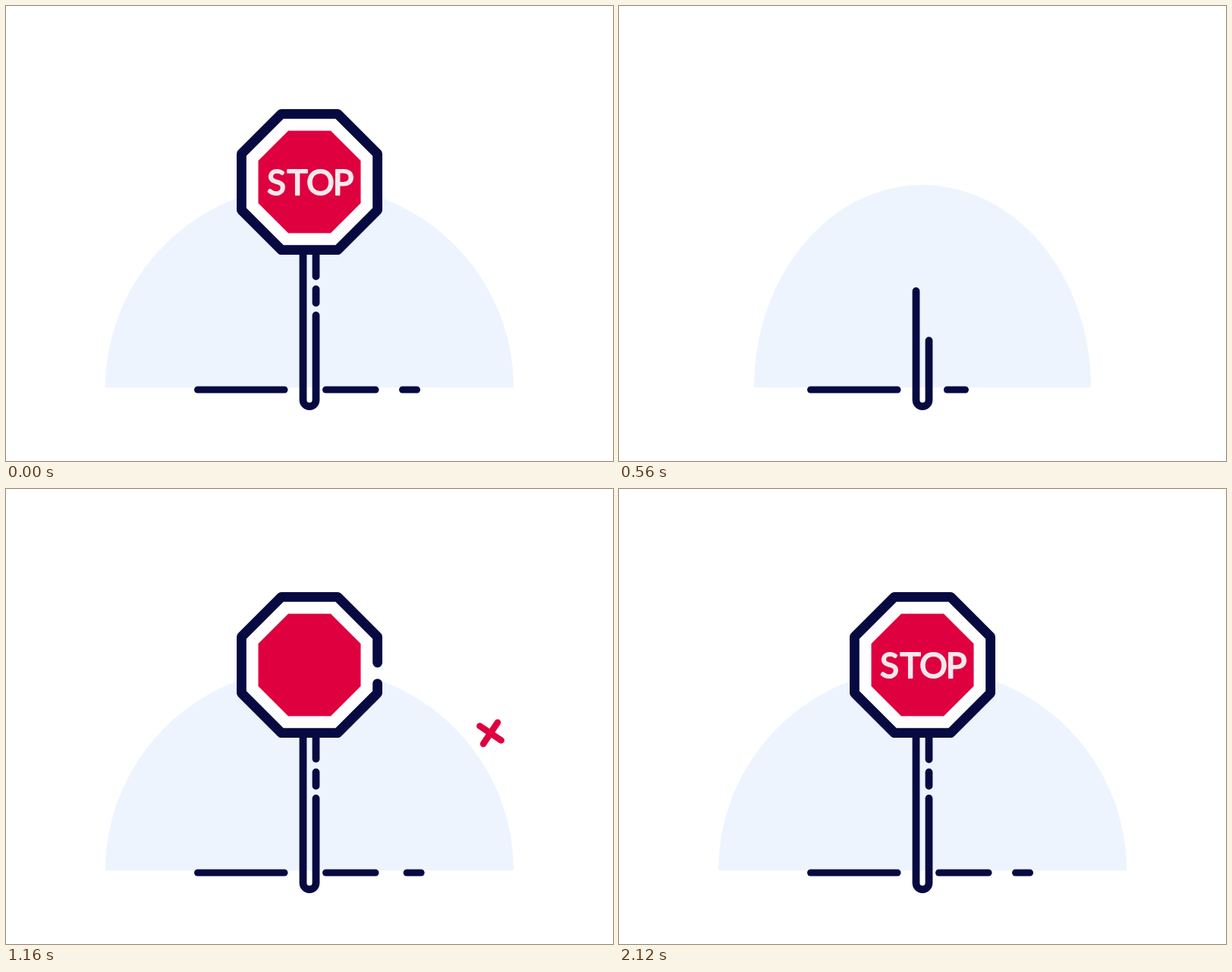
These frames come from a looping animation (800 by 600 pixels, 2320 ms). An HTML page with a canvas:

```html
<!DOCTYPE html>
<html lang="en">
<head>
<meta charset="utf-8">
<title>Stop sign</title>
<style>
html, body { margin: 0; width: 100%; height: 100%; overflow: hidden; background: #fff; }
canvas { display: block; }
</style>
</head>
<body>
<canvas id="stage" width="800" height="600"></canvas>
<script>
const ctx = document.getElementById('stage').getContext('2d');
const NAVY = '#070a41', RED = '#df003f', PALE = '#edf4fe', TEXT = '#f2e9ec';
const LOOP = 2320, STEP = 40, REST = 2120, MARK_LIFE = 380;

const linear = p => p;
const quadOut = p => 1 - (1 - p) ** 2;
const cubicOut = p => 1 - (1 - p) ** 3;
const inOut = p => p < .5 ? 2 * p * p : 1 - 2 * (1 - p) ** 2;
const progress = (t, from, to) => Math.min(1, Math.max(0, (t - from) / (to - from)));
const tween = (t, from, to, a, b, ease = quadOut) => a + (b - a) * ease(progress(t, from, to));

function line(x1, y1, x2, y2, width, color = NAVY) {
  ctx.beginPath();
  ctx.moveTo(x1, y1);
  ctx.lineTo(x2, y2);
  ctx.lineWidth = width;
  ctx.strokeStyle = color;
  ctx.stroke();
}

function dome(t) {
  const rx = tween(t, 419, 800, 0, 296, cubicOut) - tween(t, 800, 1000, 0, 27, inOut);
  const ry = tween(t, 419, 560, 0, 267, cubicOut);
  ctx.fillStyle = PALE;
  ctx.beginPath();
  ctx.ellipse(400, 503, rx, ry, 0, Math.PI, 2 * Math.PI);
  ctx.fill();
}

function ground(t) {
  const dash = (a, b) => line(a, 506, b, 506, 9);
  if (t > 80) dash(252.5, tween(t, 80, 280, 252.5, 377) - tween(t, 280, 520, 0, 10));
  if (t > 440) dash(tween(t, 430, 990, 440, 421.5),
    tween(t, 410, 800, 440, 495.5, inOut) - tween(t, 800, 1000, 0, 8.5));
  if (t > 840) {
    const x = tween(t, 840, 990, 496, 559.5) - tween(t, 990, 1240, 0, 27.5, inOut);
    const half = tween(t, 840, 990, 0, 9.5);
    dash(x - half, x + half);
  }
}

function post(t) {
  const p = tween(t, 379, 915, 0, 1, cubicOut);
  if (!p) return;
  ctx.beginPath();
  ctx.moveTo(391.5, 522 - 206 * p);
  ctx.lineTo(391.5, 519.5);
  ctx.arc(400, 519.5, 8.5, Math.PI, 0, true);
  ctx.lineTo(408.5, 522 - 114 * p);
  ctx.lineWidth = 9.8;
  ctx.strokeStyle = NAVY;
  ctx.stroke();
  if (t <= 680) return;
  const dash = (a, b) => line(408.5, a, 408.5, b, 9.8);
  dash(tween(t, 670, 960, 408, 316),
    tween(t, 670, 860, 408, 350.5) + tween(t, 1040, 1200, 0, 6, inOut));
  const y = tween(t, 680, 800, 408, 371.8) + tween(t, 800, 960, 0, 10.7);
  const half = tween(t, 680, 800, 0, 9);
  dash(y - half, y + half);
}

// Point after s sides, going up from the middle of the right side
function octagonPoint(r, s) {
  const side = Math.round(s), a = -side * Math.PI / 4;
  const d = (s - side) * 2 * r * Math.tan(Math.PI / 8);
  return [400 + r * Math.cos(a) + d * Math.sin(a), 232 + r * Math.sin(a) - d * Math.cos(a)];
}

function octagon(r, start = 0, sides = 8) {
  const end = start + sides;
  ctx.beginPath();
  ctx.moveTo(...octagonPoint(r, start));
  for (let s = .5; s < end; s++) ctx.lineTo(...octagonPoint(r, s));
  ctx.lineTo(...octagonPoint(r, end));
  if (sides === 8) ctx.closePath();
}

function word(t) {
  if (t <= 1160) return;
  const shift = tween(t, 1160, 1420, 42, 0);
  ctx.save();
  ctx.beginPath();
  ctx.rect(330, 210, 140, 44.5);
  ctx.clip();
  ctx.font = '400 46px Lato, "Open Sans", sans-serif';
  ctx.textAlign = 'center';
  ctx.fillStyle = ctx.strokeStyle = TEXT;
  ctx.lineWidth = 2;
  [['S', 356.5], ['T', 384], ['O', 414.3], ['P', 444.6]].forEach(([letter, x], i) => {
    const y = 249 + (i % 2 ? -shift : shift);
    ctx.fillText(letter, x, y);
    ctx.strokeText(letter, x, y);
  });
  ctx.restore();
}

function sign(t) {
  if (t < 600) return;
  ctx.save();
  ctx.translate(0, tween(t, 600, 1110, -235, 0, inOut));
  octagon(89.6, .04, tween(t, 600, 1175, 0, 8, p => p ** 1.8));
  ctx.fillStyle = '#fff';
  ctx.fill();
  ctx.lineWidth = 12.8;
  ctx.strokeStyle = NAVY;
  ctx.stroke();
  octagon(tween(t, 960, 1155, 0, 67.5));
  ctx.fillStyle = RED;
  ctx.fill();
  word(t);
  ctx.restore();
}

// Marks swell and shrink once
const pulse = p => Math.max(0, Math.sin(Math.PI * p)) ** 1.2;

function cross(t, birth, x, y, scale = 1) {
  const p = progress(t, birth, birth + MARK_LIFE);
  if (p === 0 || p === 1) return;
  const arm = 13.8 * pulse(p);
  ctx.save();
  ctx.translate(x, y);
  ctx.scale(scale, scale);
  ctx.rotate(tween(p, .3, .7, 0, Math.PI / 2, linear));
  line(-arm, -arm, arm, arm, 8.5, RED);
  line(-arm, arm, arm, -arm, 8.5, RED);
  ctx.restore();
}

function dot(t, birth, x, y) {
  ctx.fillStyle = RED;
  ctx.beginPath();
  ctx.arc(x, y, 12 * pulse(progress(t, birth, birth + MARK_LIFE)), 0, 2 * Math.PI);
  ctx.fill();
}

function draw(t) {
  ctx.clearRect(0, 0, 800, 600);
  ctx.lineCap = ctx.lineJoin = 'round';
  dome(t);
  ground(t);
  post(t);
  sign(t);
  cross(t, 683, 260.5, 436);
  dot(t, 768, 98, 344);
  cross(t, 913, 638.5, 322);
  cross(t, 1193, 164.5, 151.5, 1.32);
  cross(t, 1550, 658, 206);
  dot(t, 1740, 249, 423);
}

const start = performance.now();
function frame() {
  const t = Math.floor((performance.now() - start) % LOOP / STEP) * STEP;
  draw(t < 80 ? REST : t);
  requestAnimationFrame(frame);
}
frame();
</script>
</body>
</html>
```
